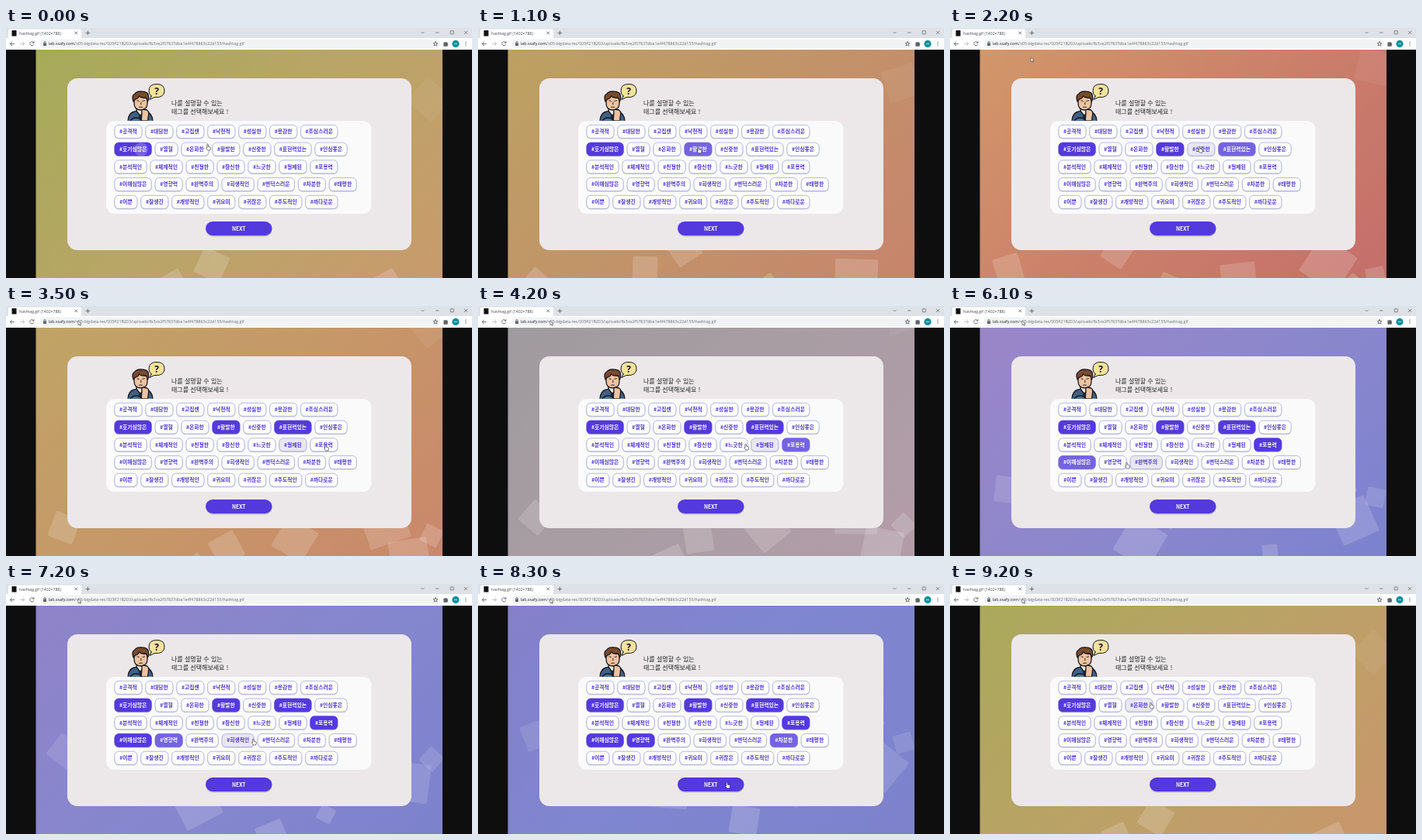
An HTML page that plays this animation: 600x323 px, repeating every 9300 ms.

```html
<!DOCTYPE html>
<html lang="ko">
<head>
<meta charset="utf-8">
<title>Hashtag picker</title>
<style>
  html, body { margin: 0; width: 100%; height: 100%; overflow: hidden; background: #0e0e0e; }
  svg { display: block; width: 600px; height: 323px; }
  .ui { font-family: "Open Sans", sans-serif; }
  .ko { font-family: "Noto Sans CJK KR", "Noto Sans CJK JP", "Noto Sans CJK", sans-serif; }
  .tag text { font-size: 6.8px; font-weight: 700; text-anchor: middle; }
  .icon { fill: none; stroke: #5f6368; stroke-width: .9; }
  .man { stroke: #17171c; stroke-width: 1.3; stroke-linejoin: round; stroke-linecap: round; }
</style>
</head>
<body>
<svg viewBox="0 0 600 323">
  <defs>
    <linearGradient id="sky" gradientUnits="userSpaceOnUse" x1="95" y1="-29" x2="505" y2="380">
      <stop offset="0"/><stop offset=".5"/><stop offset="1"/>
    </linearGradient>
    <clipPath id="stage"><rect x="38.5" y="28" width="523.5" height="295"/></clipPath>
    <clipPath id="bust"><rect x="150" y="66" width="60" height="53.7"/></clipPath>
  </defs>

  <rect width="600" height="323" fill="#0e0e0e"/>
  <g clip-path="url(#stage)">
    <rect x="38" y="28" width="524" height="295" fill="url(#sky)"/>
    <g id="squares" fill="#fff"></g>
  </g>

  <!-- browser bar -->
  <g class="ui">
    <rect width="600" height="13.5" fill="#dee1e6"/>
    <path d="M1 13.5q2 0 2-2v-7q0-3 3-3h88q3 0 3 3v7q0 2 2 2z" fill="#fff"/>
    <rect y="13" width="600" height="15" fill="#fff"/>
    <rect x="7.5" y="3" width="6" height="7.5" fill="#111"/>
    <text x="17" y="8.6" font-size="5.1" fill="#45484d">hashtag.gif (1402×788)</text>
    <g class="icon">
      <path d="M88.5 4.7l3.4 3.4m0-3.4l-3.4 3.4M102.6 6.4h5.4m-2.7-2.7v5.4"/>
      <path d="M534.5 5l2 2 2-2M553 6h4.4M572.3 3.8h4v4h-4zM590 3.8l4.2 4.2m0-4.2L590 8" stroke-width=".7"/>
      <path d="M11 20.4H5.6m2.4-2.6l-2.6 2.6L8 23"/>
      <path d="M18.2 20.4h5.4m-2.4-2.6l2.6 2.6-2.6 2.6" stroke="#b5b8bc"/>
      <path d="M35.6 18.9a2.6 2.6 0 1 0 .2 2.4M36 17.2v2h-2"/>
    </g>
    <rect x="43.5" y="14.6" width="515.5" height="11.6" rx="5.8" fill="#f1f3f4"/>
    <rect x="48" y="19.6" width="4" height="3.4" rx=".4" fill="#5f6368"/>
    <path class="icon" d="M48.8 19.8v-1a1.2 1.2 0 0 1 2.4 0v1" stroke-width=".7"/>
    <text x="55" y="22.4" font-size="5.3" fill="#6a6e73"><tspan fill="#202124">lab.ssafy.com</tspan>/s05-bigdata-rec/S05P21B203/uploads/fb3ce2f57837dba1e4f478863c22d155/hashtag.gif</text>
    <path class="icon" stroke-width=".6" d="M553 17.4l.8 2 2.1.1-1.6 1.4.5 2.1-1.8-1.2-1.8 1.2.5-2.1-1.6-1.4 2.1-.1z"/>
    <path d="M563.4 18.6h1.6a1.2 1.2 0 0 1 2.2 0h1.4v1.6a1.2 1.2 0 0 1 0 2.1v1.5h-5.2z" fill="#5f6368"/>
    <circle cx="579" cy="20.4" r="4.6" fill="#0f8f9c"/>
    <path d="M577.2 20.4h3.6" stroke="#d8eff1" stroke-width=".9"/>
    <g fill="#5f6368"><circle cx="592" cy="18.2" r=".7"/><circle cx="592" cy="20.4" r=".7"/><circle cx="592" cy="22.6" r=".7"/></g>
  </g>

  <!-- card -->
  <rect x="79" y="65" width="443" height="222" rx="13" fill="#ece8ea"/>
  <g class="man" clip-path="url(#bust)">
    <path d="M157 121q0-11 8-13l7-2 8 2q9 2 9 13z" fill="#3f6187"/>
    <path d="M168 107l5 7 5-7v-4h-10z" fill="#f4ece4"/>
    <path d="M172 112l2.6 0 1 8h-4.6z" fill="#20283a" stroke-width=".6"/>
    <path d="M165 92q0-6 8.500-6t8.500 6v5q0 9-8.500 9t-8.500-9z" fill="#efc3a0"/>
    <path d="M164 95q-3-8 2-10 2-4 9-3 8 0 8.500 6 1 4-1 7l-2-5q-6 1-9-2-2 4-5 4z" fill="#7a4a2e"/>
    <path d="M169 94l2.300.4M176 94.300l2.500-.5M173.800 96v2.800M171.500 102.200h4" fill="none" stroke-width=".9"/>
    <path d="M174 120l1-10q-1-4 1.500-5l5 1q3 2 2 6l-1 8z" fill="#efc3a0"/>
    <path d="M160 120q4-6 12-3l3 3" fill="#4d729b"/>
    <path d="M187 88l-2 4.500 6-3q13 1 13-8.500 0-8.500-10-8.500T184 81q0 4.500 3 7z" fill="#f3e39a" stroke-width="1"/>
    <text class="ui" x="194" y="86" font-size="12" font-weight="700" text-anchor="middle" stroke="none" fill="#17171c">?</text>
  </g>
  <g class="ko" font-size="8" font-weight="500" fill="#222">
    <text x="213" y="99.700">나를 설명할 수 있는</text>
    <text x="213" y="111.200">태그를 선택해보세요 !</text>
  </g>
  <rect x="129" y="120" width="341.500" height="120" rx="11" fill="#fafafb"/>
  <g id="tags" class="ko"></g>
  <circle id="ripple" cx="174" cy="156.700" r="8.800" fill="#fff" opacity=".2"/>

  <rect x="257.500" y="251.500" width="85" height="18" rx="9" fill="#000" opacity=".22"/>
  <rect id="next" x="257" y="250" width="85.500" height="18" rx="9"/>
  <text class="ko" x="299.800" y="261.500" font-size="6.800" font-weight="700" text-anchor="middle" fill="#fff">NEXT</text>

  <path id="hand" d="M-1.200-3.500q.8-.8 1.400.2l.3 2.500 2.300.6q.9.400.7 1.500l-.6 2.700h-3.300l-2-2.800q0-.9 1.200-.3z" fill="#fff" stroke="#222" stroke-width=".6"/>
  <path id="arrow" d="M0-3v5.800l1.400-1.200 1 2 .9-.4-1-2h1.800z" fill="#fff" stroke="#222" stroke-width=".5"/>
</svg>

<script>
const LOOP = 9300, INNER = 9000, STEP = 100, LIGHT = 700;
const $ = id => document.getElementById(id);

function add(parent, name, attrs) {
  const el = document.createElementNS(parent.namespaceURI, name);
  set(el, attrs);
  return parent.appendChild(el);
}
function set(el, attrs) {
  for (const k in attrs) el.setAttribute(k, attrs[k]);
}

// Linear blend through rows of [time, ...values].
function at(keys, t) {
  let i = 0;
  while (i < keys.length - 2 && keys[i + 1][0] <= t) i++;
  const a = keys[i], b = keys[i + 1];
  const p = Math.min(1, Math.max(0, (t - a[0]) / (b[0] - a[0])));
  return a.slice(1).map((v, n) => v + (b[n + 1] - v) * p);
}

const rgb = n => [n >> 16, n >> 8 & 255, n & 255];
const sky = [
  [0, 0xa5ab58, 0xb9a567, 0xc99a6c],
  [2200, 0xd29769, 0xcb806a, 0xc56e6b],
  [3500, 0xc0a466, 0xc69768, 0xca876b],
  [4900, 0x7d92d6, 0x8ba3df, 0x9cb0e4],
  [6100, 0x9a86c8, 0x8c87cc, 0x7c82cf],
  [8300, 0x8580ca, 0x7f86d0, 0x7d82cb]
].map(([t, ...c]) => [t, ...c.flatMap(rgb)]);

const handPath = [
  [0, 260, 154], [200, 259, 157], [800, 283, 157], [1200, 285, 158],
  [1750, 365, 157], [1950, 362, 157], [2080, 326, 157], [2200, 322, 157],
  [2700, 332, 172], [3390, 374, 181], [3500, 412, 183], [4000, 412, 182],
  [4700, 178, 182], [4900, 170, 183], [5400, 163, 203], [5750, 165, 203],
  [5950, 250, 204], [6100, 228, 206], [6500, 212, 204], [6900, 212, 204],
  [7400, 390, 204], [7800, 396, 204], [8150, 345, 240], [8300, 321, 260]
];
const arrowPath = [[1600, 150, 80], [2200, 104, 41], [2700, 93, 22]];

const clicks = {
  호기심많은: -LIGHT, 활발한: 900, 표현력있는: 1900, 포용력: 3700,
  이해심많은: 5700, 영향력: 6550, 차분한: 7750
};

const tags = [
  "공격적 대담한 고집센 낙천적 성실한 용감한 조심스러운",
  "호기심많은 열혈 온화한 활발한 신중한 표현력있는 인심좋은",
  "분석적인 체계적인 친절한 참신한 느긋한 절제된 포용력",
  "이해심많은 영향력 완벽주의 희생적인 변덕스러운 차분한 태평한",
  "이쁜 잘생긴 개방적인 귀요미 귀찮은 주도적인 까다로운"
].flatMap((line, row) => {
  let x = 139.5;
  const y = 125 + row * 22.75;
  return line.split(" ").map(word => {
    const w = 17.6 + 6.1 * word.length;
    const g = add($("tags"), "g", { class: "tag" });
    add(g, "rect", { x, y: y + 1, width: w, height: 17.5, rx: 5.5, fill: "#000", opacity: .16 });
    const box = add(g, "rect", { x: x + .4, y: y + .3, width: w - .8, height: 17, rx: 5.2, "stroke-width": .8 });
    const label = add(g, "text", { x: x + w / 2, y: y + 11.2 });
    label.textContent = "#" + word;
    const tag = { x, y, w, box, label, click: clicks[word] ?? Infinity };
    x += w + 4.05;
    return tag;
  });
});

// x, starting y, size, starting angle
const squares = [
  [265, 306, 36, 25], [215, 332, 32, 60], [487, 347, 55, 330], [545, 92, 42, 40],
  [372, 368, 45, 20], [284, 380, 36, 50], [75, 353, 34, 10], [520, 393, 50, 70],
  [245, 421, 52, 35], [412, 434, 20, 0], [548, 363, 24, 15], [343, 463, 36, 40]
].map(([x, y, size, angle]) => ({
  x, y, angle,
  el: add($("squares"), "rect", { x: -size / 2, y: -size / 2, width: size, height: size, rx: 2 })
}));

const stops = document.querySelectorAll("#sky stop");

function drawTag(tag, t, mx, my) {
  const { x, y, w, box, label, click } = tag;
  const on = t >= click;
  const hover = mx > x && mx < x + w && my > y && my < y + 18;
  const lit = on && t - click < LIGHT;
  const fill = on ? (lit ? "#7463e0" : "#5439dc") : hover ? "#e9e7f3" : "#fdfdfe";
  set(box, { fill, stroke: on ? fill : "#a3abd6" });
  set(label, { fill: on ? "#fff" : "#4e36d2" });
}

function draw(time) {
  const t = time % INNER, s = t / 1000;
  const c = at(sky, t).map(Math.round);
  stops.forEach((el, i) => set(el, { "stop-color": `rgb(${c.slice(i * 3, i * 3 + 3)})` }));

  for (const q of squares) {
    const y = q.y - 19 * s;
    set(q.el, {
      transform: `translate(${q.x} ${y}) rotate(${q.angle + 28.8 * s})`,
      opacity: Math.max(.05, Math.min(.17, (y - 20) / 1700))
    });
  }

  // Hover trails the pointer slightly.
  const [mx, my] = t < STEP ? [0, 0] : at(handPath, t - STEP);
  tags.forEach(tag => drawTag(tag, t, mx, my));
  set($("ripple"), { visibility: t < 2 * STEP ? "visible" : "hidden" });
  set($("next"), { fill: t > 8500 && t < 8800 ? "#6a54e0" : "#5439dc" });

  set($("hand"), { transform: `translate(${at(handPath, t)})` });
  set($("arrow"), {
    transform: `translate(${at(arrowPath, time)})`,
    visibility: time < arrowPath[0][0] ? "hidden" : "visible"
  });
}

function tick() {
  const time = performance.now() % LOOP;
  draw(Math.floor(time / STEP) * STEP);
  requestAnimationFrame(tick);
}
tick();
</script>
</body>
</html>
```
